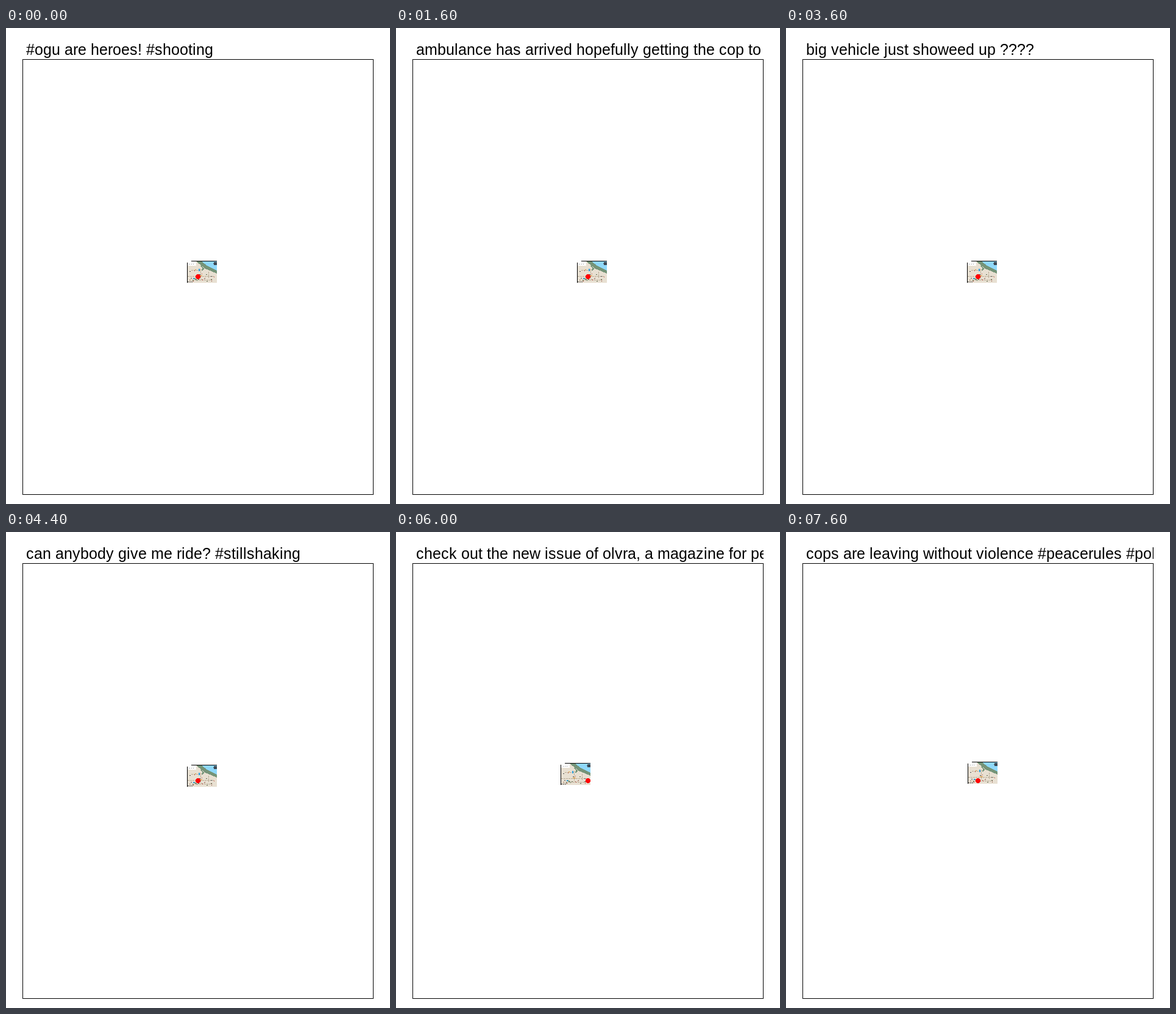
Recreate the animation shown at these times as an HTML page. Size 630 by 779 pixels, loop 8 s.

```html
<!DOCTYPE html>
<html lang="en">
<head>
<meta charset="utf-8">
<title>Messages on a map</title>
<style>
  html, body { margin: 0; width: 100%; height: 100%; overflow: hidden; background: #fff; }
  svg { display: block; }
  #line {
    font: 25px "Liberation Sans", Arial, sans-serif;
    font-kerning: none;
    font-variant-ligatures: none;
  }
  #map { shape-rendering: crispEdges; }
</style>
</head>
<body>
<svg width="630" height="779" viewBox="0 0 630 779">
  <defs>
    <clipPath id="page"><rect width="603" height="779"/></clipPath>
    <clipPath id="sheet"><rect width="49" height="36"/></clipPath>
  </defs>
  <rect x="27.5" y="51.5" width="575" height="712" fill="none" stroke="#000" shape-rendering="crispEdges"/>
  <g clip-path="url(#page)"><text id="line" y="44"></text></g>
  <g id="map"><g clip-path="url(#sheet)">
    <rect width="49" height="36" fill="#e8e0d2"/>
    <path d="M15 1H49V21L40 17L30 13L24 8Z" fill="#759478"/>
    <path d="M24 1H49V16L41 12L33 8Z" fill="#8fd8fa"/>
    <path d="M23 8L27 13L24 16M12 29L17 32" fill="none" stroke="#759478" stroke-width="2"/>
    <path d="M1 25.5H44M7 15.5H23M22.5 13V30M4 31.5H40M35.5 18V28" fill="none" stroke="#b9ab94" stroke-dasharray="3 1"/>
    <path d="M20 24.5h5M13 14.5h2" stroke="#e8a23c"/>
    <g id="marks"></g>
    <path d="M19 13h2v4h-2zM10 28h2v2h-2z" fill="#2a9fe0"/>
    <path d="M0 0H15V8H1V2H0Z" fill="#fff"/>
    <path d="M4 5.5h8" stroke="#888" stroke-dasharray="1 2"/>
    <path d="M7 .5H49M.5 3V36" stroke="#000"/>
    <path d="M1 34.5h8" stroke="#444" stroke-dasharray="2 1"/>
    <circle cx="46.5" cy="4.5" r="3" fill="#3d4a55"/>
  </g></g>
  <circle cx="315" cy="407" r="4" fill="#f00" shape-rendering="crispEdges"/>
</svg>
<script>
const STEP = 400, LEFT = 33;
const HOME = [297, 381], EAST = [298, 376], WEST = [270, 378];
const steps = [
  ["#ogu are heroes! #shooting", HOME],
  ["#ogu holding their ground #hero", EAST],
  ["#shooting near the bank everyone stay inside!!", HOME],
  ["2 police cars just went past my window", EAST],
  ["ambulance has arrived hopefully getting the cop to", HOME],
  ["and now it is quiet again over here", EAST],
  ["anybody out there watching the standoff i iwll gladly", HOME],
  ["anyone know why the whole street is closed off", EAST],
  ["apparently the van is still parked outside the shop and", HOME],
  ["big vehicle just showeed up ????", HOME],
  ["bikes and cars are backed up all the way to the bridge", EAST],
  ["can anybody give me ride? #stillshaking", HOME],
  ["candles are being handed out to everyone who is still", HOME],
  ["candles for the officer tonight at the square near the", HOME],
  ["candor is what we need from the police now", EAST],
  ["check out the new issue of olvra, a magazine for people", WEST],
  ["city streets are so empty tonight", EAST],
  ["come down to the park and see what is happening here", WEST],
  ["cop cars are starting to pull out now", WEST],
  ["cops are leaving without violence #peacerules #pok", EAST]
];

const line = document.getElementById("line");
const map = document.getElementById("map");
const pen = document.createElement("canvas").getContext("2d");
pen.font = '25px "Liberation Sans", Arial, sans-serif';

// Glyphs advance by whole pixels, as in hinted text.
function advances(text) {
  let x = LEFT;
  return [...text].map(ch => {
    const at = x;
    x += Math.round(pen.measureText(ch).width);
    return at;
  }).join(" ");
}

// Small place marks scattered over the land.
let seed = 7;
const rnd = n => (seed = seed * 16807 % 2147483647) % n;
const inks = ["#8a4b3c", "#5d6b4e", "#c63a30", "#555"];
let marks = "";
for (let i = 0; i < 22; i++) {
  const x = 3 + rnd(44), y = 11 + rnd(23);
  if (y > x * 0.5 + 3) marks += `<rect x="${x}" y="${y}" width="${1 + i % 2}" height="1" fill="${inks[i % 4]}"/>`;
}
document.getElementById("marks").innerHTML = marks;

let shown = -1;
function show(i) {
  if (i === shown) return;
  shown = i;
  const [text, [x, y]] = steps[i];
  line.setAttribute("x", advances(text));
  line.textContent = text;
  map.setAttribute("transform", `translate(${x} ${y})`);
}

const start = performance.now();
function tick(now) {
  show(Math.floor(Math.max(0, now - start) / STEP) % steps.length);
  requestAnimationFrame(tick);
}
show(0);
requestAnimationFrame(tick);
</script>
</body>
</html>
```
